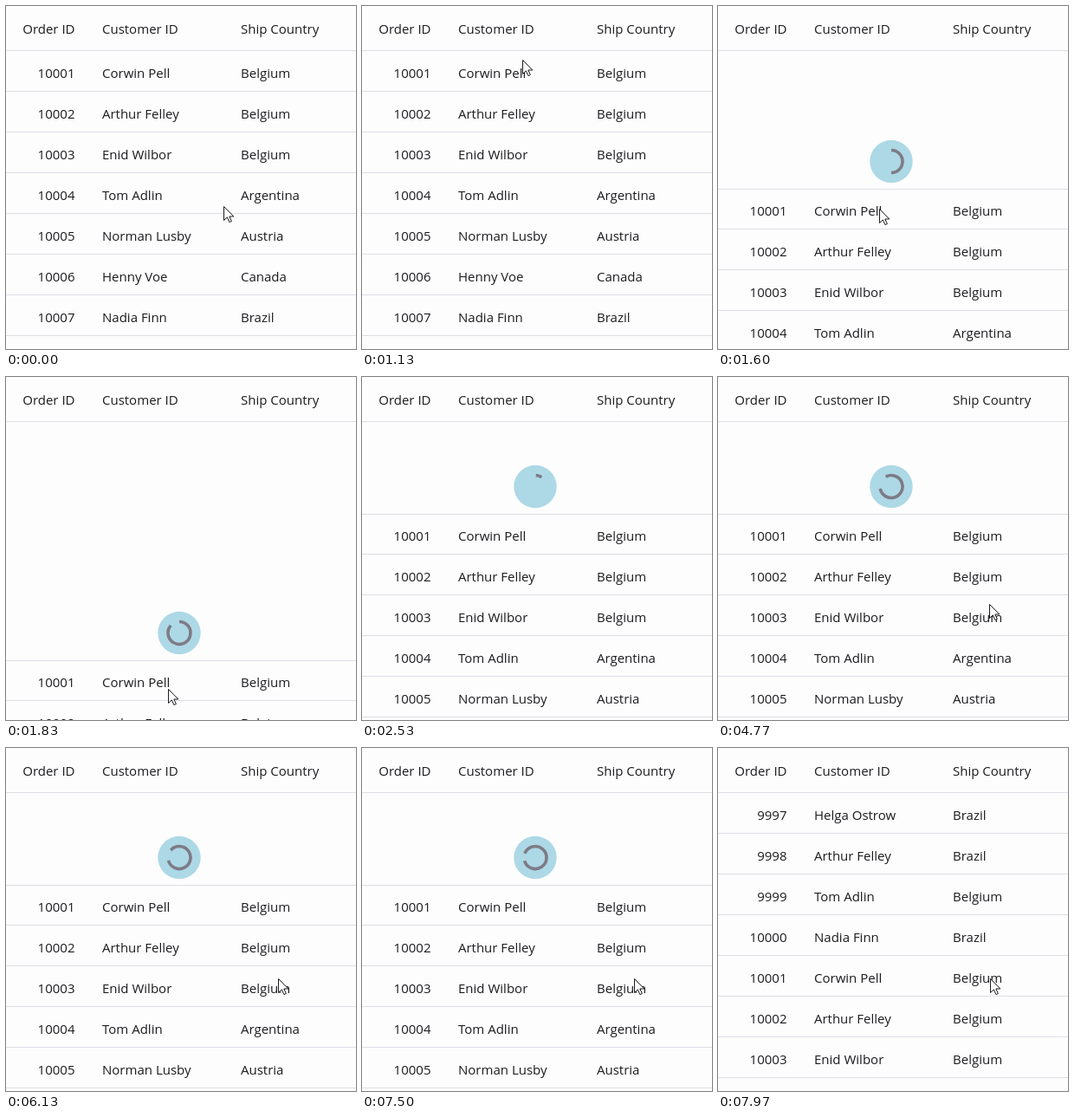
Write an HTML page that moves like this. It is 404x396 px and loops after 8 s.

```html
<!DOCTYPE html>
<html lang="en">
<head>
<meta charset="utf-8">
<title>Pull to refresh</title>
<style>
html, body { margin: 0; width: 100%; height: 100%; overflow: hidden; background: #fdfdfd; }
svg { display: block; width: 100vw; height: 100vh; }
text { font: 15px "Open Sans", "Noto Sans", sans-serif; fill: #1c1b1f; }
.line { fill: #dedee6; }
</style>
</head>
<body>
<svg id="stage" viewBox="0 0 404 396">
  <defs><clipPath id="body"><rect y="52" width="404" height="344"/></clipPath></defs>
  <rect width="404" height="396" fill="#fdfdfd"/>
  <g id="header"></g>
  <rect class="line" y="51" width="404" height="1"/>
  <g clip-path="url(#body)">
    <g id="spinner">
      <circle r="24.7" fill="#add8e6"/>
      <path id="arc" fill="none" stroke="#7e7b86" stroke-width="3.6"/>
    </g>
    <g id="list">
      <rect class="line" id="topLine" y="52" width="404" height="1"/>
      <g id="rows"></g>
    </g>
  </g>
  <path id="cursor" d="M.5 .5v16l3.8-3.6 2.6 5.7 2.5-1.1-2.6-5.5h5z" fill="#fdfdfd" stroke="#1c1b1f"/>
</svg>
<script>
const LOOP = 8000, ROW = 47, REST = 106, MAX_PULL = 306;
const PULL_START = 1180, PULL_END = 2000, RELEASE = 2400, SPIN_START = 2420, LOADED = 7560;
const SPIN_PERIOD = 1304;

// The first ADDED rows arrive with the refresh.
const ADDED = 4;
const data = [
  [9997, "Helga Ostrow", "Brazil"],
  [9998, "Arthur Felley", "Brazil"],
  [9999, "Tom Adlin", "Belgium"],
  [10000, "Nadia Finn", "Brazil"],
  [10001, "Corwin Pell", "Belgium"],
  [10002, "Arthur Felley", "Belgium"],
  [10003, "Enid Wilbor", "Belgium"],
  [10004, "Tom Adlin", "Argentina"],
  [10005, "Norman Lusby", "Austria"],
  [10006, "Henny Voe", "Canada"],
  [10007, "Nadia Finn", "Brazil"]
];

const $ = id => document.getElementById(id);
const clamp = x => Math.min(1, Math.max(0, x));
const part = (t, a, b) => clamp((t - a) / (b - a));
const smooth = x => 0.5 - 0.5 * Math.cos(Math.PI * x);
const easeOut = x => 1 - (1 - x) ** 3;
const mix = (a, b, x) => a + (b - a) * x;
const move = (id, x, y) => $(id).setAttribute("transform", `translate(${x} ${y})`);
const show = (el, on) => { el.style.display = on ? "" : "none"; };

const cells = ([order, name, country], y) =>
  `<text x="79.5" y="${y}" text-anchor="end">${order}</text>` +
  `<text x="111" y="${y}">${name}</text><text x="271" y="${y}">${country}</text>`;

$("header").innerHTML = cells(["Order ID", "Customer ID", "Ship Country"], 32);
$("rows").innerHTML = data.map((row, i) =>
  `<g>${cells(row, 83 + i * ROW)}` +
  `<rect class="line" y="${98 + i * ROW}" width="404" height="1"/></g>`).join("");
const addedRows = [...$("rows").children].slice(0, ADDED);

function pullOffset(t) {
  if (t < RELEASE) return MAX_PULL * smooth(part(t, PULL_START, PULL_END));
  if (t < LOADED) return mix(MAX_PULL, REST, easeOut(part(t, RELEASE, 2520)));
  return REST * (1 - smooth(part(t, LOADED, 7860)));
}

function cursorAt(t) {
  if (t < PULL_START) {
    const k = smooth(part(t, 100, 850));
    return [mix(251, 185, k), mix(231, 62, k)];
  }
  if (t < 4200) {
    const k = smooth(part(t, PULL_START, PULL_END));
    return [mix(185, 187, k), 62 + 331 * k + 15 * part(t, PULL_END, 2150)];
  }
  const k = easeOut(part(t, 4200, 4720)), nudge = part(t, 4800, 4950);
  return [mix(392, 313, k) + nudge, mix(382, 262, k) + 4 * nudge];
}

// Angles in degrees, clockwise from twelve o'clock.
function arcPath(start, sweep) {
  const r = 13;
  const point = deg => {
    const a = deg * Math.PI / 180;
    return `${(r * Math.sin(a)).toFixed(2)} ${(-r * Math.cos(a)).toFixed(2)}`;
  };
  return `M${point(start)}A${r} ${r} 0 ${sweep > 180 ? 1 : 0} 1 ${point(start + sweep)}`;
}

function render(t) {
  const offset = Math.round(pullOffset(t)), loaded = t >= LOADED;
  move("list", 0, offset);
  move("rows", 0, loaded ? 0 : -ADDED * ROW);
  addedRows.forEach(row => show(row, loaded));
  show($("topLine"), offset > 0);

  show($("spinner"), offset > 0);
  move("spinner", 200, offset + 20.5);
  const spin = t - SPIN_START;
  $("arc").setAttribute("d", spin < 0
    ? arcPath(0, 360 * offset / 318)
    : arcPath(5 - 0.0145 * spin, 359 * (spin / SPIN_PERIOD % 1)));

  const [x, y] = cursorAt(t);
  move("cursor", Math.round(x), Math.round(y));
}

const begin = performance.now();
function tick() {
  render((performance.now() - begin) % LOOP);
  requestAnimationFrame(tick);
}
tick();
</script>
</body>
</html>
```
